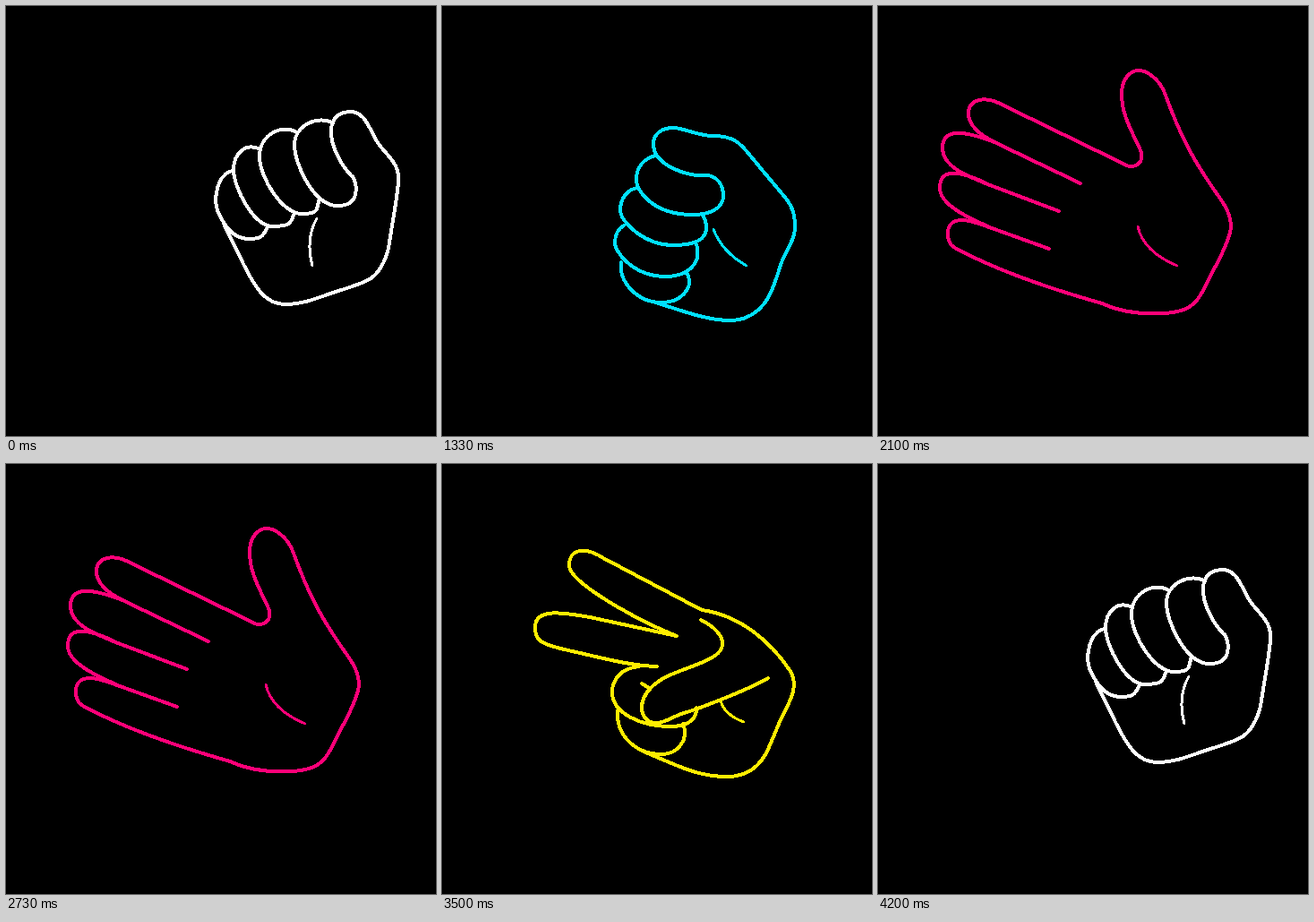
Animation, 480 px wide and 480 px high, one loop 4270 ms. Source, as an HTML page:

```html
<!DOCTYPE html>
<html lang="en">
<head>
<meta charset="utf-8">
<title>Rock, paper, scissors</title>
<style>
html, body { margin: 0; width: 100%; height: 100%; overflow: hidden; background: #000; }
svg { display: block; width: 100%; height: 100%; }
path {
  fill: none; stroke-width: 4; stroke-linecap: round; stroke-linejoin: round;
  shape-rendering: crispEdges;
}
#crease { stroke-width: 3; }
</style>
</head>
<body>
<svg viewBox="0 0 480 480">
  <path id="lines"/>
  <path id="crease"/>
</svg>
<script>
const LOOP = 4270, HOLD = 700;

const ready = {
  color: "#ffffff",
  palm: `M387 191C362 166 350 120 383 118C402 117 406 140 416 154S440 176 438 197S433 232 427 270
    C424 284 416 300 404 306S380 315 365 320S332 333 312 333S281 320 265 288L243 243`,
  fingers: [
    "M365 131C349 121 322 133 322 155S344 223 370 223S392 200 387 190",
    "M325 141C307 131 283 144 283 168S309 232 330 232S346 226 350 215",
    "M284 160C268 152 254 164 254 183S276 246 298 246S318 240 322 231",
    "M253 184C236 187 229 217 239 235S258 260 272 260S287 256 292 247"
  ],
  crease: "M347 237Q334 260 342 290"
};

const rock = {
  color: "#00e1ff",
  palm: `M297 189C276 192 236 178 236 154C236 142 246 136 258 136S286 145 302 145
    C326 145 333 153 345 168S376 205 384 215S394 234 394 248S382 276 378 289
    S371 312 366 322S348 351 322 351S270 341 236 330`,
  fingers: [
    "M238 167C224 171 217 181 217 194S236 233 280 233C299 233 314 226 314 212S306 190 296 189",
    "M219 203C207 204 199 215 199 228S226 267 258 267C282 267 296 261 295 246Q295 240 291 234",
    "M203 245C196 249 193 257 193 265S212 302 250 302C274 302 288 287 285 273Q285 266 282 264",
    "M200 286C197 308 218 331 245 331C266 331 280 316 275 301L272 297"
  ],
  crease: "M303 249Q312 274 340 290"
};

const paper = {
  color: "#ff0078",
  palm: `M280 179C292 180 297 171 293 161C282 137 272 121 272 98C272 82 281 72 291 72S314 82 320 97
    C340 153 358 181 382 215C390 226 394 237 394 246S384 278 376 292S360 328 350 334
    C338 346 285 348 250 332C190 315 130 294 86 270`,
  fingers: [
    "M226 198L130 152C110 142 101 132 101 120C101 104 118 101 134 108L280 179",
    "M130 152C104 142 72 133 72 158C72 180 100 190 125 200L202 229",
    "M125 200C103 189 69 175 69 203C69 222 100 236 127 248L191 271",
    "M86 270C74 264 74 239 93 239C105 239 118 245 127 248"
  ],
  crease: "M290 246Q296 274 334 290"
};

const scissors = {
  color: "#ffed00",
  palm: `M290 163C334 169 368 200 388 230C394 239 395 250 388 265S380 280 376 290
    S368 309 365 316S352 349 318 349S262 336 225 321`,
  fingers: [
    "M262 192C219 175 170 146 152 129C142 120 139 112 145 102C151 95 163 94 180 105L290 163",
    "M262 192L165 171C140 167 104 159 104 182C104 199 112 202 150 210C180 217 210 225 240 226",
    "M220 226C200 228 190 240 190 255C190 278 222 293 255 293C274 293 285 285 284 272M223 245L231 250",
    "M196 275C194 305 218 324 245 324C264 324 276 307 269 290",
    `M289 174C312 186 326 205 296 219C270 231 249 234 234 249C216 267 222 289 239 289
      C250 289 259 281 270 278S338 254 364 239`
  ],
  crease: "M311 264Q315 280 337 288"
};

const throws = [rock, paper, scissors];
const lines = document.getElementById("lines");
const crease = document.getElementById("crease");
let shown = null;

// Every throw follows an equally long pause on the closed fist.
function handAt(time) {
  const beat = Math.floor((time % LOOP) / HOLD);
  return beat % 2 ? throws[(beat - 1) / 2] : ready;
}

function draw(time) {
  const hand = handAt(time);
  if (hand === shown) return;
  shown = hand;
  lines.setAttribute("d", hand.palm + hand.fingers.join(""));
  crease.setAttribute("d", hand.crease);
  for (const path of [lines, crease]) path.setAttribute("stroke", hand.color);
}

const start = performance.now();
function tick() {
  draw(performance.now() - start);
  requestAnimationFrame(tick);
}
tick();
</script>
</body>
</html>
```
